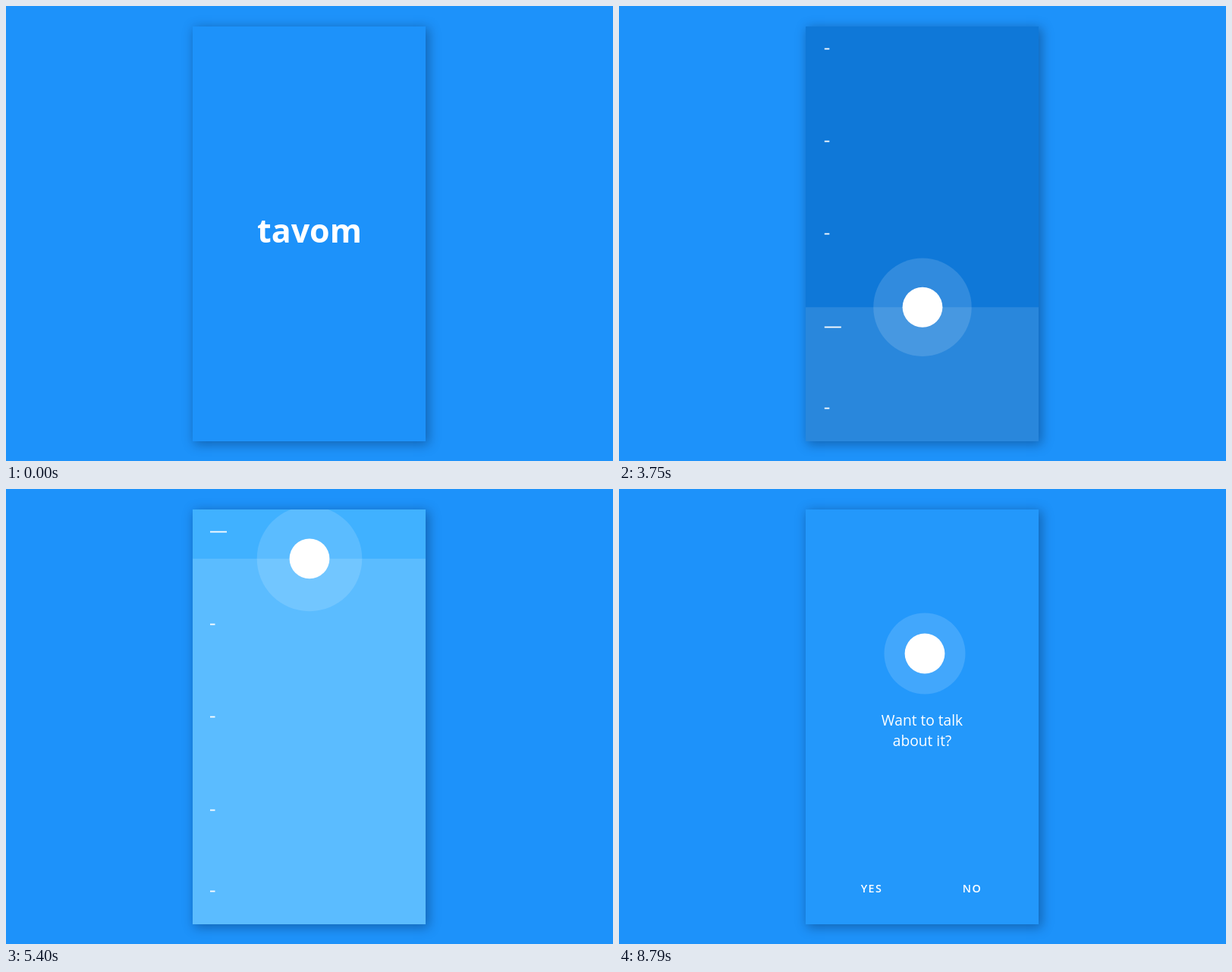
An HTML page for the animation above (8820 ms loop, 800 by 600 pixels).

```html
<!DOCTYPE html>
<html lang="en">
<head>
<meta charset="utf-8">
<title>Mood slider</title>
<style>
  html, body { margin: 0; width: 100%; height: 100%; overflow: hidden; background: #1d92fa; }
  #card {
    position: absolute; left: 246px; top: 27px; width: 307px; height: 547px;
    overflow: hidden; background: #1d92fa;
    box-shadow: 3px 3px 14px 1px rgba(0, 20, 50, .36);
  }
  svg { position: absolute; left: 0; top: 0; display: block; }
  text { font-family: "Open Sans", "Noto Sans", sans-serif; fill: #fff; text-anchor: middle; }
  .copy { font-size: 19.2px; font-weight: 400; }
  .button { font-size: 14.4px; font-weight: 600; letter-spacing: 1.4px; }
  #logo { font-size: 43px; font-weight: 700; }
</style>
</head>
<body>
<div id="card">
  <svg width="307" height="547" viewBox="246 27 307 547">
    <rect id="level" x="246" width="307" height="700" fill="#fff"/>
    <g id="ticks" stroke="#fff" stroke-width="1.8"></g>
    <circle id="halo" fill="#fff" fill-opacity=".14"/>
    <circle id="dot" fill="#fff"/>
    <text id="logo" x="400" y="311.5">tavom</text>
    <g id="intro">
      <g class="copy">
        <text x="400" y="166">Slide the circle up</text>
        <text x="400" y="193">or down to record</text>
        <text x="400" y="220">your mood.</text>
      </g>
      <text class="button" x="403" y="532">SKIP &gt;</text>
    </g>
    <g id="outro">
      <g class="copy">
        <text x="399.5" y="312">Want to talk</text>
        <text x="399.5" y="339">about it?</text>
      </g>
      <text class="button" x="333" y="532">YES</text>
      <text class="button" x="465.5" y="532">NO</text>
    </g>
  </svg>
</div>
<script>
const LOOP = 8820;
const TICKS = [56.5, 178.5, 300.5, 423.5, 530.5];
// start, end, from y, to y
const MOVES = [
  [3430, 4110, 300.8, 530],
  [4110, 5870, 530, 56],
  [5960, 7060, 56, 266.5]
];
// y, red, green, blue
const SHADES = [[92, 64, 177, 255], [266, 35, 152, 251], [300, 29, 146, 250], [475, 3, 99, 189]];

const $ = id => document.getElementById(id);
const set = (el, attrs) => { for (const k in attrs) el.setAttribute(k, attrs[k]); };
const clamp = x => Math.min(1, Math.max(0, x));
const ramp = (t, a, b) => clamp((t - a) / (b - a));
const mix = (a, b, p) => a + (b - a) * p;
const inOut = s => s < .5 ? 4 * s ** 3 : 1 - 4 * (1 - s) ** 3;
const ease = (t, a, b) => inOut(ramp(t, a, b));
const pulse = (t, start) => 49 + 5 * Math.sin((t - start) / 1500 * 2 * Math.PI);

const lines = TICKS.map(y => {
  const line = document.createElementNS("http://www.w3.org/2000/svg", "line");
  set(line, { y1: y, y2: y });
  $("ticks").append(line);
  return line;
});

function slideY(t) {
  let y = MOVES[0][2];
  for (const [a, b, from, to] of MOVES) if (t >= a) y = mix(from, to, ease(t, a, b));
  return y;
}

function shade(y) {
  let i = 0;
  while (i < SHADES.length - 2 && y > SHADES[i + 1][0]) i++;
  const [y0, ...from] = SHADES[i], [y1, ...to] = SHADES[i + 1];
  const p = (y - y0) / (y1 - y0);
  return `rgb(${from.map((c, k) => Math.round(Math.min(255, Math.max(0, mix(c, to[k], p)))))})`;
}

function draw(t) {
  const press = ease(t, 3300, 4033);
  const release = ease(t, 7090, 7740);
  const enter = 1 - (1 - ramp(t, 600, 950)) ** 3;
  const level = slideY(t);
  const x = mix(400, 403, release), y = mix(level, 217, release);
  const rest = t < 5000 ? pulse(t, 2237) * enter : pulse(t, 8523);

  $("card").style.background = shade(level);
  set($("level"), { y: level, opacity: .14 * press * (1 - release) });
  set($("halo"), { cx: x, cy: y, r: mix(rest, 69.3, press * (1 - release)) });
  set($("dot"), { cx: x, cy: y, r: 26.4 * enter });

  const left = 269 + 8 * (1 - press);
  set($("ticks"), { opacity: ramp(t, 3320, 3700) * (1 - ramp(t, 7110, 7450)) });
  lines.forEach((line, i) => {
    const near = Math.max(0, 55 - Math.abs(level - TICKS[i]));
    set(line, { x1: left, x2: left + 6.5 + Math.min(15.5, near * 1.6) });
  });

  set($("logo"), { opacity: 1 - ramp(t, 300, 390) });
  set($("intro"), { opacity: ramp(t, 800, 1700) * (1 - ramp(t, 2700, 3290)) });
  set($("outro"), { opacity: ramp(t, 7750, 8400) });
}

const begin = performance.now();
function tick() {
  draw((performance.now() - begin) % LOOP);
  requestAnimationFrame(tick);
}
tick();
</script>
</body>
</html>
```
